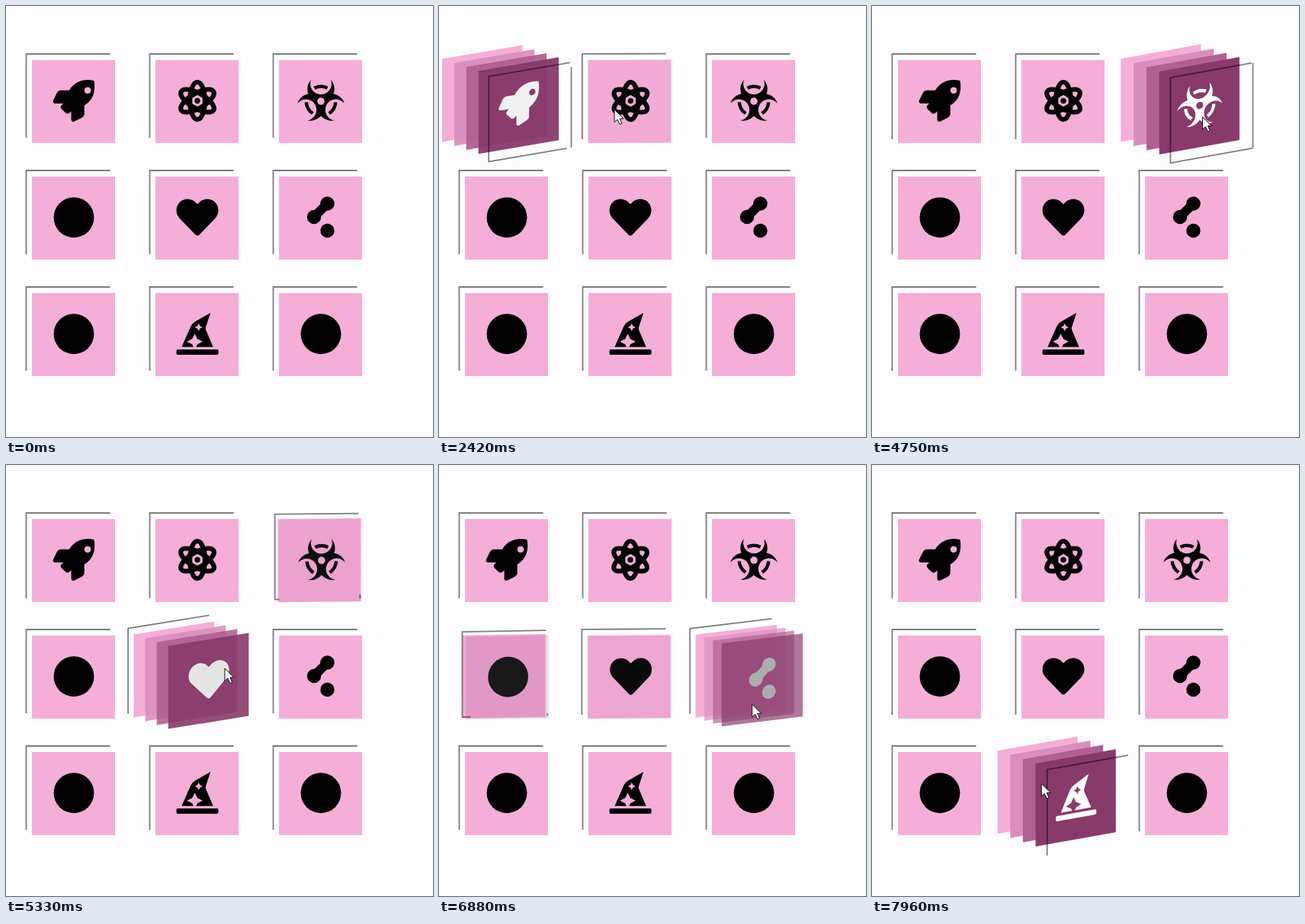
Animation of 560x566 px, one loop 8 s. Source, as an HTML page:

```html
<!DOCTYPE html>
<html lang="en">
<head>
<meta charset="utf-8">
<title>Layered tiles</title>
<style>
  html, body { margin: 0; width: 100%; height: 100%; overflow: hidden; background: #fdfcfe; }
  svg { display: block; width: 560px; height: 566px; }
  .frame { fill: none; stroke: rgba(0, 0, 0, .5); stroke-width: 1.8; }
</style>
</head>
<body>
<svg viewBox="0 0 560 566">
  <defs>
    <path id="rocket" fill-rule="evenodd" d="M505 19q-3-9-12-12C380-14 270 15 199 128H95q-28 0-43 26L3 253q-9 30 21 35h104l-23 22q-20 22 0 45l51 51q23 17 45 0l23-22v104q5 30 35 21l98-49q27-15 27-43V313c110-70 138-165 121-294zM384 128a40 40 0 1 1 0 .1z"/>
    <g id="atom" transform="translate(256 256)">
      <g id="orbits" fill="none" stroke-width="58"></g>
      <circle r="34"/>
    </g>
    <mask id="core" maskUnits="userSpaceOnUse" x="-40" y="-40" width="80" height="80">
      <path fill="#fff" d="M-40-40h80v80h-80z"/>
      <circle r="4.8" fill="#000"/>
    </mask>
    <g id="hazard" transform="translate(256 261) scale(9.31)">
      <g id="lobes" mask="url(#core)"></g>
    </g>
    <path id="heart" d="M462 63C407 16 326 24 276 76l-20 20-20-20C186 24 105 16 50 63c-63 53-66 149-10 207l193 200c13 13 33 13 46 0l193-200c56-58 53-154-10-207z"/>
    <g id="nodes">
      <circle cx="335" cy="88" r="86"/>
      <circle cx="172" cy="251" r="86"/>
      <circle cx="335" cy="419" r="86"/>
      <path d="M335 88L172 251" stroke-width="112"/>
    </g>
    <path id="hat" fill-rule="evenodd" d="M496 448H16q-16 0-16 16v32q0 16 16 16h480q16 0 16-16v-32q0-16-16-16zM192 384l-64-32 64-32 32-64 32 64 64 32-64 32-16 32h208l-86-202q-10-22-2-45L416 0 228 107q-37 21-53 59L64 416h144zM256 160l16-32 16 32 32 16-32 16-16 32-16-32-32-16z"/>
    <circle id="disc" cx="256" cy="258" r="246"/>
  </defs>
  <g id="grid"></g>
  <path id="cursor" fill="#fff" stroke="#111" d="M0 0V16.5L4 13L7 19.5L9.8 18.2L7 12H12Z"/>
</svg>
<script>
const LOOP = 8000, FADE = 500, HALF = 54.5;
const COLORS = ['#f4aed8', '#d98fbe', '#b06092', '#883a6a'];
const ICONS = ['rocket', 'atom', 'hazard', 'disc', 'heart', 'nodes', 'disc', 'hat', 'disc'];
// Key points of the pointer: time, x, y
const STOPS = [
  [170, 70, 15], [1070, 88, 87], [2250, 88, 87], [2385, 143, 125], [2420, 230, 136],
  [3540, 300, 142], [3567, 362, 142], [3790, 431, 143], [4940, 434, 146], [5025, 300, 240],
  [5330, 287, 267], [5660, 240, 272], [5783, 80, 279], [6250, 60, 280], [6530, 75, 284],
  [6710, 400, 300], [6950, 415, 320], [6972, 415, 390], [7330, 356, 427], [7540, 300, 424],
  [8000, 215, 418]
];

const $ = id => document.getElementById(id);
const clamp = v => Math.max(0, Math.min(1, v));
const mix = (a, b, u) => a + (b - a) * u;

// cubic-bezier(.25, .1, .25, 1)
function ease(x) {
  x = clamp(x);
  let lo = 0, hi = 1, u;
  for (let i = 0; i < 24; i++) {
    u = (lo + hi) / 2;
    const bx = .75 * u * (1 - u) ** 2 + .75 * u * u * (1 - u) + u ** 3;
    if (bx < x) lo = u; else hi = u;
  }
  return .3 * u * (1 - u) ** 2 + 3 * u * u * (1 - u) + u ** 3;
}

// Stages of a hover, by the time since the pointer came in
const spread = d => ease(d / FADE);
const jump = d => clamp((d - 395) / 30);
const bottom = d => ease((d - 435) / 340);
const side = d => ease((d - 775) / 340);

function pointer(t) {
  const i = STOPS.findIndex(stop => stop[0] > t);
  if (i < 1) return null;
  const [t0, x0, y0] = STOPS[i - 1], [t1, x1, y1] = STOPS[i];
  const u = (t - t0) / (t1 - t0);
  return [mix(x0, x1, u), mix(y0, y1, u)];
}

// Enter and leave times of a tile; its frame adds 8px at the left and top
function findVisits(x, y) {
  const over = v => v >= -HALF - 8 && v <= HALF;
  const visits = [];
  let inside = false;
  for (let t = 0; t < LOOP; t++) {
    const at = pointer(t);
    const hit = !!at && over(at[0] - x) && over(at[1] - y);
    if (hit && !inside) visits.push([t, Infinity]);
    if (!hit && inside) visits[visits.length - 1][1] = t;
    inside = hit;
  }
  return visits;
}

function level(visits, t, rise) {
  const visit = visits.filter(v => t >= v[0]).pop();
  if (!visit) return 0;
  const [enter, leave] = visit;
  return t < leave ? rise(t - enter) : rise(leave - enter) * (1 - ease((t - leave) / FADE));
}

const turns = (step, part) => [0, 1, 2].map(i => part(i * step)).join('');
$('orbits').innerHTML = turns(60, a => `<ellipse rx="92" ry="228" transform="rotate(${a})"/>`);
$('lobes').innerHTML = turns(120, a => `<g transform="rotate(${a})">
  <path stroke="none" d="M-13-28A17.7 17.7 0 1 0 13-28A14 14 0 1 1-13-28z"/>
  <path fill="none" stroke-width="4.4" d="M-8.5-17.3A19.3 19.3 0 0 1 8.5-17.3"/></g>`);

const tiles = ICONS.map((icon, i) => {
  const x = 88.5 + i % 3 * 162, y = 125.5 + Math.floor(i / 3) * 153;
  const g = document.createElementNS('http://www.w3.org/2000/svg', 'g');
  g.setAttribute('transform', `translate(${x} ${y})`);
  g.innerHTML = COLORS.map(c =>
    `<rect x="${-HALF}" y="${-HALF}" width="109" height="109" fill="${c}"/>`).join('') +
    `<g stroke-width="0"><use href="#${icon}" transform="translate(-27 -28.5) scale(.1074)"/></g>
     <path class="frame"/>`;
  $('grid').append(g);
  return {
    layers: g.querySelectorAll('rect'),
    front: g.querySelector('g'),
    frame: g.querySelector('.frame'),
    visits: findVisits(x, y)
  };
});

function drawTile({ layers, front, frame, visits }, t) {
  const [p, m, b, s] = [spread, jump, bottom, side].map(f => level(visits, t, f));
  const place = (el, x, y) =>
    el.setAttribute('transform', `matrix(${1 - .035 * p} ${-.174 * p} 0 1 ${x} ${y})`);
  layers.forEach((el, k) => {
    place(el, (k - 2) * 16.8 * p, (k - 2) * 5.6 * p);
    if (k) el.setAttribute('opacity', p);
  });
  place(front, 16.8 * p, 5.6 * p);
  const v = Math.round(255 * p), ink = `rgb(${v},${v},${v})`;
  front.setAttribute('fill', ink);
  front.setAttribute('stroke', ink);
  place(frame, -7 - 33.6 * p + 72.6 * m, -7.5 - 11.2 * p + 32.7 * m);
  let d = 'M-55 55V-55H55';
  if (b > 0) d += `M-55 55v2h${112 * b}`;
  if (s > 0) d += `M57 57v${-112 * s}`;
  frame.setAttribute('d', d);
}

function drawCursor(t) {
  const at = pointer(t);
  $('cursor').style.display = at ? '' : 'none';
  if (at) $('cursor').setAttribute('transform', `translate(${at})`);
}

const start = performance.now();
function draw() {
  const t = (performance.now() - start) % LOOP;
  tiles.forEach(tile => drawTile(tile, t));
  drawCursor(t);
  requestAnimationFrame(draw);
}
draw();
</script>
</body>
</html>
```
